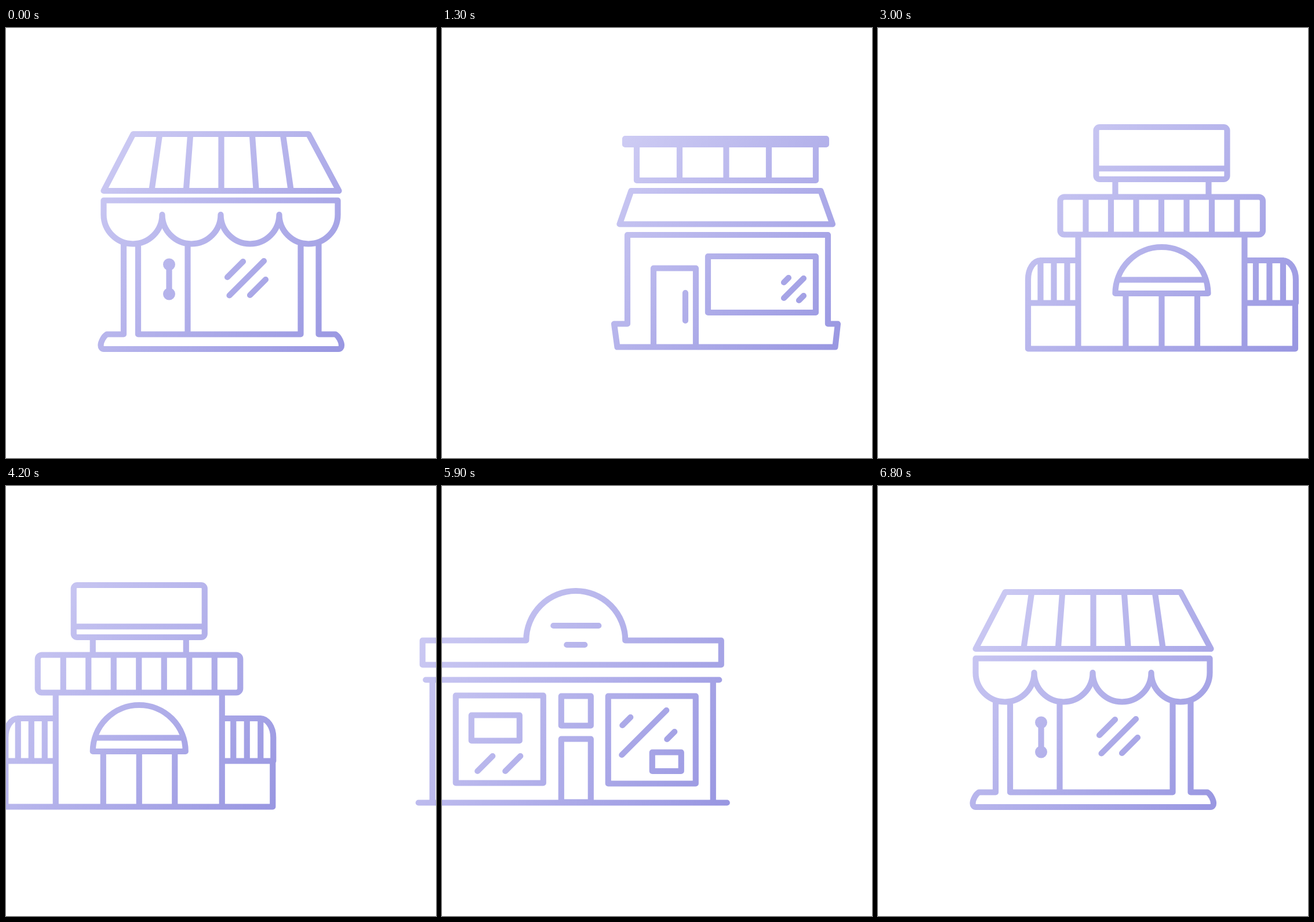
Animation of 742 by 742 pixels, one loop 6.82 s. Source, as an HTML page with a canvas:

```html
<!DOCTYPE html>
<html lang="en">
<head>
<meta charset="utf-8">
<title>Shop carousel</title>
<style>
  html, body { margin: 0; width: 100%; height: 100%; overflow: hidden; background: #fff; }
  canvas { display: block; }
</style>
</head>
<body>
<canvas id="stage" width="742" height="742"></canvas>
<script>
const SIZE = 742, CENTER = 371.25, LOOP = 6820, SLOT = 1700, HOLD = 700, STEP = 100;
const ctx = document.getElementById('stage').getContext('2d');

// Path helpers; x runs from the middle of each shop.
const line = (x1, y1, x2, y2) => `M${x1} ${y1}L${x2} ${y2}`;
const posts = (y1, y2, ...xs) => xs.map(x => line(x, y1, x, y2)).join('');
const bars = (y, ...ends) => ends.map(([a, b]) => line(a, y, b, y)).join('');
const slash = (x, y, d) => line(x, y, x - d, y + d);
const box = (l, t, r, b) => `M${l} ${t}H${r}V${b}H${l}Z`;
const roundBox = (l, t, r, b, c) => {
  const arc = (dx, dy) => `a${c} ${c} 0 0 1 ${dx} ${dy}`;
  return `M${l + c} ${t}H${r - c}${arc(c, c)}V${b - c}${arc(-c, c)}` +
         `H${l + c}${arc(-c, -c)}V${t + c}${arc(c, -c)}Z`;
};

function shop(half, top, bottom, parts, dots = []) {
  const color = ctx.createLinearGradient(-half, top, half, bottom);
  color.addColorStop(0, '#cfcdf4');
  color.addColorStop(1, '#9896e1');
  const fill = new Path2D();
  for (const [x, y, r] of dots) {
    fill.moveTo(x + r, y);
    fill.arc(x, y, r, 0, 2 * Math.PI);
  }
  return { half, color, fill, outline: new Path2D(parts.join('')) };
}

const market = shop(213, 178, 559, [
  'M-151.75 183H150.75L203.25 281H-202.75Z',
  line(-106, 183, -120, 281), line(-53, 183, -60.5, 281), line(0.25, 183, 0.25, 281),
  line(53.5, 183, 60.5, 281), line(106.5, 183, 120.5, 281),
  'M-202.75 297.5H201.25V322' + 'a50.5 50.5 0 0 1 -101 0'.repeat(4) + 'Z',
  'M-168.25 371V528.5H-197.25C-203 532 -207.75 542 -207.75 547.5C-207.75 551 -206 554 -202.5 554' +
  'H202.5C206 554 207.75 551 207.75 547.5C207.75 542 203 532 197.25 528.5H168.25V371',
  'M-143.25 372V528.5H137.25V372',
  posts(372, 528, -57.75), posts(408, 459, -89.75),
  slash(37.75, 403, 27), slash(73.75, 402, 59.5), slash(76.75, 434, 27)
], [[-89.75, 408, 10.5], [-89.75, 459, 10.5]]);

const cafe = shop(198, 186, 556, [
  box(-174, 191, 173, 201),
  'M-154 201V263H155V201', posts(201, 263, -80, 0.5, 74),
  'M-163.5 281H163.5L184 338.5H-183.5Z',
  'M-170 357H176V510.5H193L188.5 550.5H-187.5L-193 510.5H-170Z',
  'M-125 550V414.5H-52V550', posts(457, 505, -70),
  box(-31, 394, 155, 491),
  slash(108, 431, 8), slash(134, 432, 34), slash(134, 462, 8)
]);

const theater = shop(236, 166, 559, [
  roundBox(-113.5, 171, 112.5, 261, 6), bars(242.5, [-113.5, 112.5]),
  posts(261, 291, -80.5, 80.5),
  roundBox(-175.5, 291.5, 174, 356.5, 7),
  posts(291.5, 356.5, ...Array.from({ length: 7 }, (_, i) => -131.5 + 43.5 * i)),
  posts(356.5, 553.5, -144.5, 142.5),
  'M-144.5 401H-209C-222 401 -231 416 -231 434V553.5H230V474.5',
  'M142.5 401H208C221 401 231 416 231 434V474.5',
  bars(474.5, [-231, -144.5], [142.5, 231]),
  posts(401, 474.5, -209.5, -186.5, -163.5, 162, 185.5, 209),
  'M-80.5 458a80 80 0 0 1 160 0Z', bars(434.5, [-76, 75]),
  posts(458, 553.5, -62.5, -0.5, 61)
]);

const store = shop(266, 176, 552, [
  'M-253.5 266.5H-85a85.5 85.5 0 0 1 171 0H251.5V308.5H-253.5Z',
  bars(241, [-38, 40]), bars(274, [-15, 16]),
  bars(334.5, [-248, 248]), posts(334.5, 546.5, -236.5, 237.5), bars(546.5, [-260.5, 261.5]),
  box(-206.5, 361.5, -55.5, 512.5), box(-179.5, 395.5, -96.5, 439.5),
  slash(-143, 466, 26), slash(-95, 466, 26),
  box(-24.5, 362.5, 26.5, 413.5), box(-24.5, 436.5, 26.5, 545.5),
  box(56.5, 362.5, 207.5, 513.5), box(132.5, 459.5, 182.5, 492),
  slash(95, 399, 14), slash(157, 387, 77), slash(171, 424, 13)
]);

const shops = [market, cafe, theater, store];

function drawShop({ half, color, fill, outline }, x) {
  if (x + half < 0 || x - half > SIZE) return;
  ctx.save();
  ctx.translate(x, 0);
  ctx.strokeStyle = ctx.fillStyle = color;
  ctx.lineWidth = 10.2;
  ctx.lineCap = ctx.lineJoin = 'round';
  ctx.stroke(outline);
  ctx.fill(fill);
  ctx.restore();
}

// Each slot holds one shop, then slides to the next in ten quadratic ease-out steps.
function frame(now) {
  const t = now % LOOP;
  const index = Math.floor(t / SLOT);
  const step = Math.max(0, Math.floor((t % SLOT - HOLD) / STEP));
  const left = (1 - step / 10) ** 2;
  ctx.clearRect(0, 0, SIZE, SIZE);
  drawShop(shops[index % 4], CENTER - SIZE * (1 - left));
  drawShop(shops[(index + 1) % 4], CENTER + SIZE * left);
  requestAnimationFrame(frame);
}

const start = performance.now();
const tick = frame;
frame(0);
</script>
</body>
</html>
```
